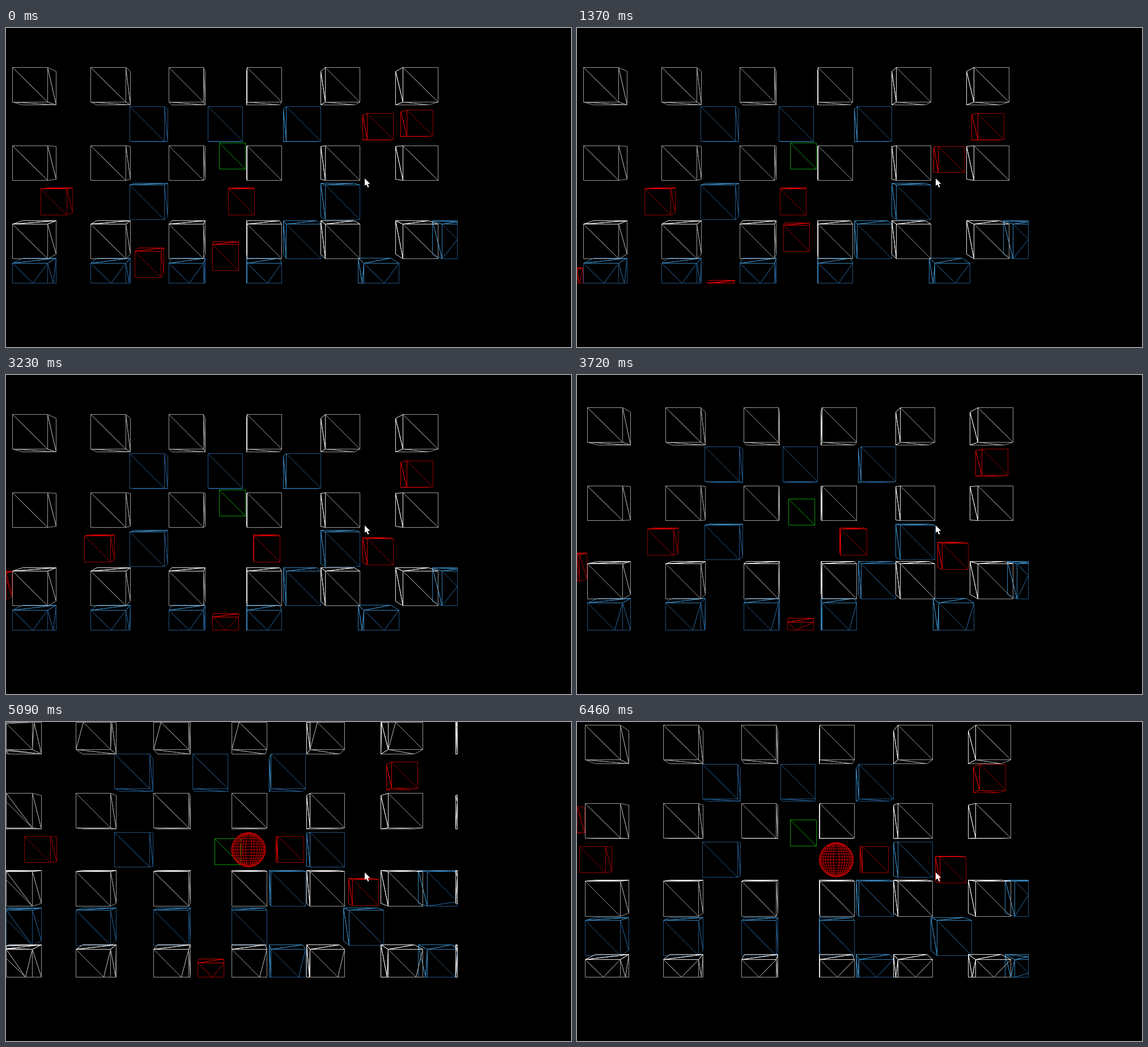
An HTML page with a canvas that plays this animation: 997 by 562 pixels, repeating every 6510 ms.

```html
<!DOCTYPE html>
<html>
<head>
<meta charset="utf-8">
<style>
html, body { margin: 0; width: 100%; height: 100%; overflow: hidden; background: #000; }
canvas { display: block; }
</style>
</head>
<body>
<canvas id="stage" width="997" height="562"></canvas>
<script>
const ctx = document.getElementById('stage').getContext('2d');
const LOOP = 6510, TILE = 68.9, BLOCK = 61.4, ACTOR = 46;
const VIEW_W = 796.4, VIEW_H = 449.4, MID_X = 398.5, MID_Y = 225;
const BLOCK_FAR = 0.9545, ACTOR_FAR = 0.966;
const SPEED = 0.0425, CAMERA_RATE = 0.0035, BOMB_TIME = 4800;

// Wall tiles as [column, row]
const bricks = [[3, 1], [5, 1], [7, 1], [3, 3], [8, 3], [7, 4], [11, 4],
  [0, 5], [2, 5], [4, 5], [6, 5], [9, 5], [7, 6], [11, 6]];
const pillars = [];
for (let row = 0; row <= 6; row += 2)
  for (let col = 0; col <= 12; col += 2) pillars.push([col, row]);

// Paths are [time, value] stops joined by straight lines
const playerX = [[0, 388], [3340, 388], [3450, 377.6], [4080, 377.6], [4550, 408.5],
  [4803, 432], [5335, 384.5]];
const playerY = [[0, 156], [3357, 156], [4400, 236], [4700, 236], [4770, 241.5],
  [6125, 241.5], [LOOP, 182.5]];

function follow(path, t) {
  for (let i = 1; i < path.length; i++) {
    const [t0, a] = path[i - 1], [t1, b] = path[i];
    if (t < t1) return a + (b - a) * (t - t0) / (t1 - t0);
  }
  return path[path.length - 1][1];
}

// The camera eases after the player
function camera(path, t) {
  const step = 5;
  let pos = path[0][1];
  for (let s = 0; s < t; s += step) {
    const dt = Math.min(step, t - s);
    pos += (follow(path, s + dt / 2) - pos) * (1 - Math.exp(-CAMERA_RATE * dt));
  }
  return pos;
}

// Walks from start, turning round at each [time, place]
const walk = (start, ...turns) => [[0, start], ...turns];

const enemies = [
  { x: 649, path: walk(104, [5000, 317], [LOOP, 253]) },
  { x: 239, path: walk(347, [LOOP, 624]) },
  { x: 376, path: walk(335, [1083, 289], [LOOP, 520]) },
  { x: -37.5, path: walk(441, [LOOP, 164]) },
  { y: 237, path: walk(73, [2525, 179.5], [LOOP, 10]) },
  { y: 237, path: walk(404, [1083, 358], [4967, 522.5], [5843, 485], [LOOP, 513.5]) }
];

function bounce(t) {
  const s = (8 + SPEED * t) % 40;
  return 90 + Math.min(s, 40 - s);
}

// Clips one triangle against an edge and returns zero, one or two triangles
function clip(tri, axis, limit, sign) {
  const isIn = p => sign * (limit - p[axis]) >= 0;
  const inside = tri.filter(isIn), outside = tri.filter(p => !isIn(p));
  const cut = (p, q) => {
    const k = (limit - p[axis]) / (q[axis] - p[axis]);
    return [p[0] + (q[0] - p[0]) * k, p[1] + (q[1] - p[1]) * k];
  };
  if (inside.length === 3) return [tri];
  if (inside.length === 0) return [];
  if (inside.length === 1) {
    const p = inside[0];
    return [[p, cut(p, outside[0]), cut(p, outside[1])]];
  }
  const [a, b] = inside, c = cut(a, outside[0]);
  return [[a, b, c], [b, c, cut(b, outside[0])]];
}

const edges = [[1, 0, -1], [1, VIEW_H, 1], [0, 0, -1], [0, VIEW_W, 1]];
const snap = v => Math.round(v) + 0.5;

function addTriangle(out, a, b, c) {
  const area = (b[0] - a[0]) * (c[1] - a[1]) - (b[1] - a[1]) * (c[0] - a[0]);
  if (area <= 0) return;
  let parts = [[a, b, c]];
  for (const e of edges) parts = parts.flatMap(tri => clip(tri, ...e));
  for (const tri of parts) {
    tri.forEach(([x, y], i) => out[i ? 'lineTo' : 'moveTo'](snap(x), snap(y)));
    out.closePath();
  }
}

function addQuad(out, a, b, c, d) {
  addTriangle(out, a, b, c);
  addTriangle(out, a, c, d);
}

// Left and top faces catch the light
function addCube(dim, lit, x, y, size, far) {
  const front = [[x, y], [x + size, y], [x + size, y + size], [x, y + size]];
  const back = front.map(([px, py]) => [MID_X + (px - MID_X) * far, MID_Y + (py - MID_Y) * far]);
  const [tl, tr, br, bl] = front, [TL, TR, BR, BL] = back;
  addQuad(dim, tl, tr, br, bl);
  addQuad(dim, tr, TR, BR, br);
  addQuad(dim, bl, br, BR, BL);
  addQuad(lit, TL, tl, bl, BL);
  addQuad(lit, tl, TL, TR, tr);
}

function stroke(color, path) {
  ctx.strokeStyle = color;
  ctx.stroke(path);
}

function drawCubes(dimColor, litColor, cubes) {
  const dim = new Path2D(), lit = new Path2D();
  for (const cube of cubes) addCube(dim, lit, ...cube);
  stroke(dimColor, dim);
  stroke(litColor, lit);
}

function drawSphere(x, y, r) {
  const n = 18, mesh = new Path2D();
  for (let i = 1; i < n; i++) {
    const a = Math.PI * i / n, h = r * Math.sin(a), v = y - r * Math.cos(a);
    mesh.moveTo(x - h, v);
    mesh.lineTo(x + h, v);
  }
  for (let i = 0; i < n / 2; i++) {
    const w = r * Math.cos(Math.PI * i / n);
    mesh.moveTo(x + w, y);
    mesh.ellipse(x, y, w, r, 0, 0, 2 * Math.PI);
  }
  stroke('#c80000', mesh);
}

function drawCursor(x, y) {
  ctx.beginPath();
  for (const [dx, dy] of [[0, 0], [0, 13], [3, 10.5], [5.5, 16], [7.5, 15], [5.2, 9.7], [9.5, 9.5]])
    ctx.lineTo(x + dx, y + dy);
  ctx.fillStyle = '#fff';
  ctx.fill();
}

function draw(t) {
  const left = 399.3 - camera(playerX, t), top = MID_Y - camera(playerY, t);
  const block = ([col, row]) => [left + col * TILE, top + row * TILE, BLOCK, BLOCK_FAR];
  const actor = (x, y) => [left + x - ACTOR / 2, top + y - ACTOR / 2, ACTOR, ACTOR_FAR];
  const foes = enemies.map(({ x, y, path }) => {
    const p = follow(path, t);
    return actor(x ?? p, y ?? p);
  });
  foes.push(actor(718.5, bounce(t)));

  ctx.fillStyle = '#000';
  ctx.fillRect(0, 0, 997, 562);
  ctx.lineWidth = 1;
  drawCubes('#20527f', '#3580b4', bricks.map(block));
  drawCubes('#989898', '#e8e8e8', pillars.map(block));
  drawCubes('#900000', '#cc0000', foes);
  drawCubes('#0a940a', '#0a940a', [actor(follow(playerX, t), follow(playerY, t))]);
  if (t >= BOMB_TIME) drawSphere(left + 443.2, top + 238, 30);
  drawCursor(633, 265);
}

function frame() {
  draw(performance.now() % LOOP);
  requestAnimationFrame(frame);
}
frame();
</script>
</body>
</html>
```
